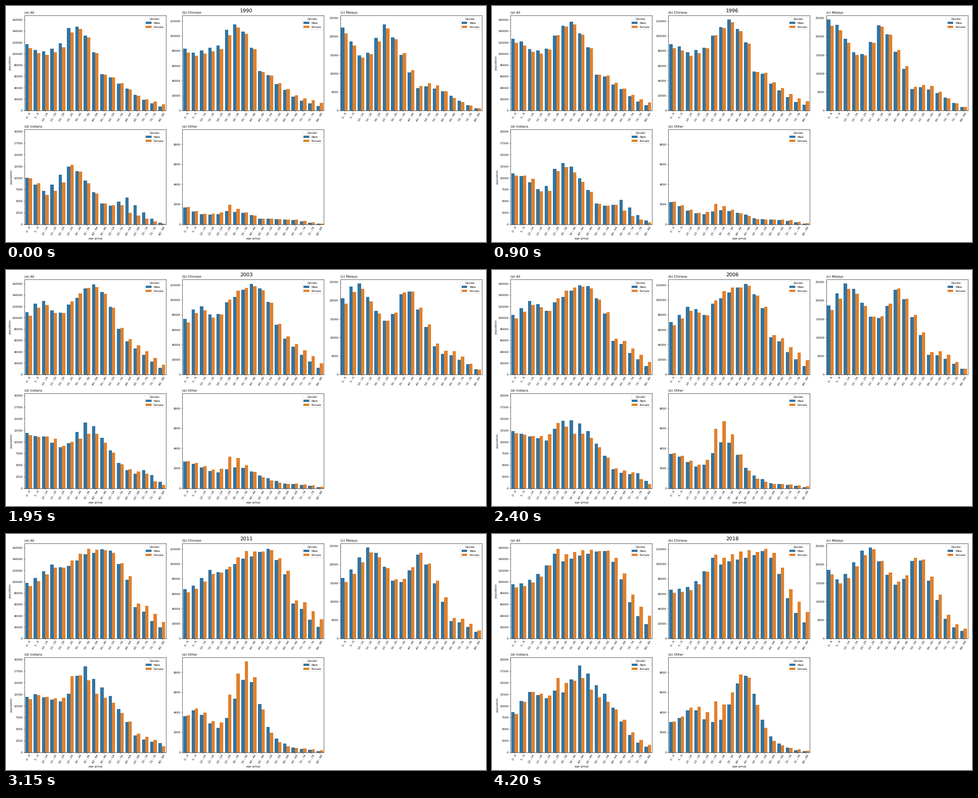
Write a matplotlib script that moves like this. It is 1065x526 px and loops after 4.35 s.

```python
import matplotlib.pyplot as plt
import numpy as np
from matplotlib.animation import FuncAnimation

W, H, DPI = 1065, 526, 44.375
FIRST_YEAR, LAST_YEAR = 1990, 2018
AGE = np.arange(17)  # five-year groups
LABELS = [f"{5 * a} - {5 * a + 4}" for a in AGE]
BLUE, ORANGE = "#3274a1", "#e1812c"
PANEL_W, PANEL_H = 314, 212

# Each group is a set of generations that grow older together:
#   born   key points (birth year, adult size in thousands)
#   youth  size of a generation as children, relative to its adult size
#   life   age group around which a generation dies out
#   waves  later arrivals: (central birth year, spread, thousands)
#   sex_by_age, sex_by_birth  key points of the two factors of women per man
GROUPS = {
    "Chinese": dict(
        born=[(1910, 12), (1923, 18), (1931, 31), (1937, 40), (1941, 51),
              (1946, 53.5), (1951, 92.5), (1959, 120), (1962, 123.5), (1970, 111),
              (1987, 101), (1993, 119), (1997, 118), (2003, 99), (2009, 88), (2018, 87)],
        youth=0.775, life=16.8, waves=[],
        sex_by_age=[(0, 0.83), (3, 0.835), (6, 0.965), (10, 0.985),
                    (13, 1.1), (14, 1.22), (16, 1.65)],
        sex_by_birth=[(1964, 1), (1974, 1.13)]),
    "Malays": dict(
        born=[(1910, 1.9), (1928, 5.8), (1940, 6.8), (1946, 6), (1951, 11.4),
              (1956, 16), (1964, 23.5), (1967, 22.8), (1973, 16.4), (1979, 14.2),
              (1994, 25.4), (1998, 23.8), (2009, 16.8), (2014, 15.8), (2018, 18.6)],
        youth=1, life=15.6, waves=[],
        sex_by_age=[(0, 0.93), (4, 0.95), (7, 1.03), (11, 1.05), (16, 1.25)],
        sex_by_birth=[(1925, 0.75), (1935, 1.08), (1948, 1.04),
                      (1962, 0.96), (1975, 1.03), (1988, 1)]),
    "Indians": dict(
        born=[(1910, 1.3), (1926, 5.6), (1931, 6.8), (1938, 4), (1946, 4.7),
              (1951, 7.5), (1963, 13.5), (1969, 14.2), (1979, 9), (1993, 14.6),
              (1997, 14.7), (2009, 17.2), (2013, 14.7), (2018, 11.6)],
        youth=0.77, life=15.6, waves=[(1978, 6.5, 9.3)],
        sex_by_age=[(0, 0.96), (4, 1.05), (5, 1.2), (7, 1), (11, 0.98), (16, 1.3)],
        sex_by_birth=[(1930, 0.42), (1937, 1.05), (1950, 0.97), (1963, 0.88),
                      (1972, 0.79), (1980, 0.88), (1986, 1.08), (1993, 1)]),
    "Other": dict(
        born=[(1910, 0.3), (1925, 0.6), (1945, 0.56), (1950, 0.95), (1965, 1.5),
              (1979, 1.4), (1985, 1.9), (1996, 3.4), (2008, 4), (2018, 4.4)],
        youth=0.69, life=15.2, waves=[(1974, 10.5, 6.4), (2005, 8, 1.7)],
        sex_by_age=[(0, 1.02), (3, 1.08), (4, 1.22), (5, 1.68), (7, 1.25),
                    (10, 0.88), (12, 0.83), (16, 1.25)],
        sex_by_birth=[(1940, 1.15), (1950, 0.85), (1965, 0.88), (1975, 1)]),
}
ARRIVALS = [(1997, 0), (2003, 0.12), (2008, 0.8), (2012, 1)]
GROWING_UP = [(0, -0.1), (4, 0.05), (5, 0.6), (7, 1)]

# title, left, top (pixels), y limit
PANELS = [
    ("(a) All", 41.1, 20.7, 167900),
    ("(b) Chinese", 391.35, 20.7, 127800),
    ("(c) Malays", 741.6, 20.7, 25750),
    ("(d) Indians", 41.1, 274.7, 20480),
    ("(e) Other", 391.35, 274.7, 9500),
]


def curve(x, points):
    return np.interp(x, *zip(*points))


def group_population(group, year):
    """Men and women of one group by age."""
    birth = year - 5 * AGE
    youth = group["youth"]
    grown = youth + (1 - youth) * curve(AGE, GROWING_UP)
    men = curve(birth, group["born"]) * grown
    for center, spread, size in group["waves"]:
        men += size * curve(year, ARRIVALS) * np.exp(-((birth - center) / spread) ** 2)
    men *= 1000 * np.exp(-(AGE / group["life"]) ** 7.7)
    women = men * curve(AGE, group["sex_by_age"]) * curve(birth, group["sex_by_birth"])
    return np.array([men, women])


def population(name, year):
    if name == "All":
        return sum(group_population(g, year) for g in GROUPS.values())
    return group_population(GROUPS[name], year)


def add_panel(title, left, top, limit):
    ax = fig.add_axes([left / W, 1 - (top + PANEL_H) / H, PANEL_W / W, PANEL_H / H])
    bars = [ax.bar(AGE + offset, 0 * AGE, 0.4, color=color, linewidth=0, label=label)
            for label, offset, color in (("Male", -0.2, BLUE), ("Female", 0.2, ORANGE))]
    ax.set_xlim(-0.5, len(AGE) - 0.5)
    ax.set_ylim(0, limit)
    ax.set_xticks(AGE, LABELS, rotation=60)
    ax.set_title(title, loc="left")
    ax.legend(title="Gender", loc="upper right")
    if left < 100:
        ax.set_ylabel("population")
    if top > 100:
        ax.set_xlabel("age group")
    return title.split()[1], bars


plt.rcParams.update({"font.family": "DejaVu Sans", "font.size": 10,
                     "text.hinting": "none", "axes.linewidth": 1.1,
                     "xtick.major.width": 1.1, "ytick.major.width": 1.1})
fig = plt.figure(figsize=(W / DPI, H / DPI), dpi=DPI, facecolor="white")
year_text = fig.text(533 / W, 1 - 13.6 / H, "", fontsize=18,
                     ha="center", va="baseline")
charts = [add_panel(*panel) for panel in PANELS]


def update(frame):
    year = FIRST_YEAR + frame
    year_text.set_text(str(year))
    for name, bars in charts:
        for container, heights in zip(bars, population(name, year)):
            for bar, height in zip(container, heights):
                bar.set_height(height)
    return []


anim = FuncAnimation(fig, update, frames=LAST_YEAR - FIRST_YEAR + 1,
                     interval=150, repeat=True, blit=False)
plt.show()
```
